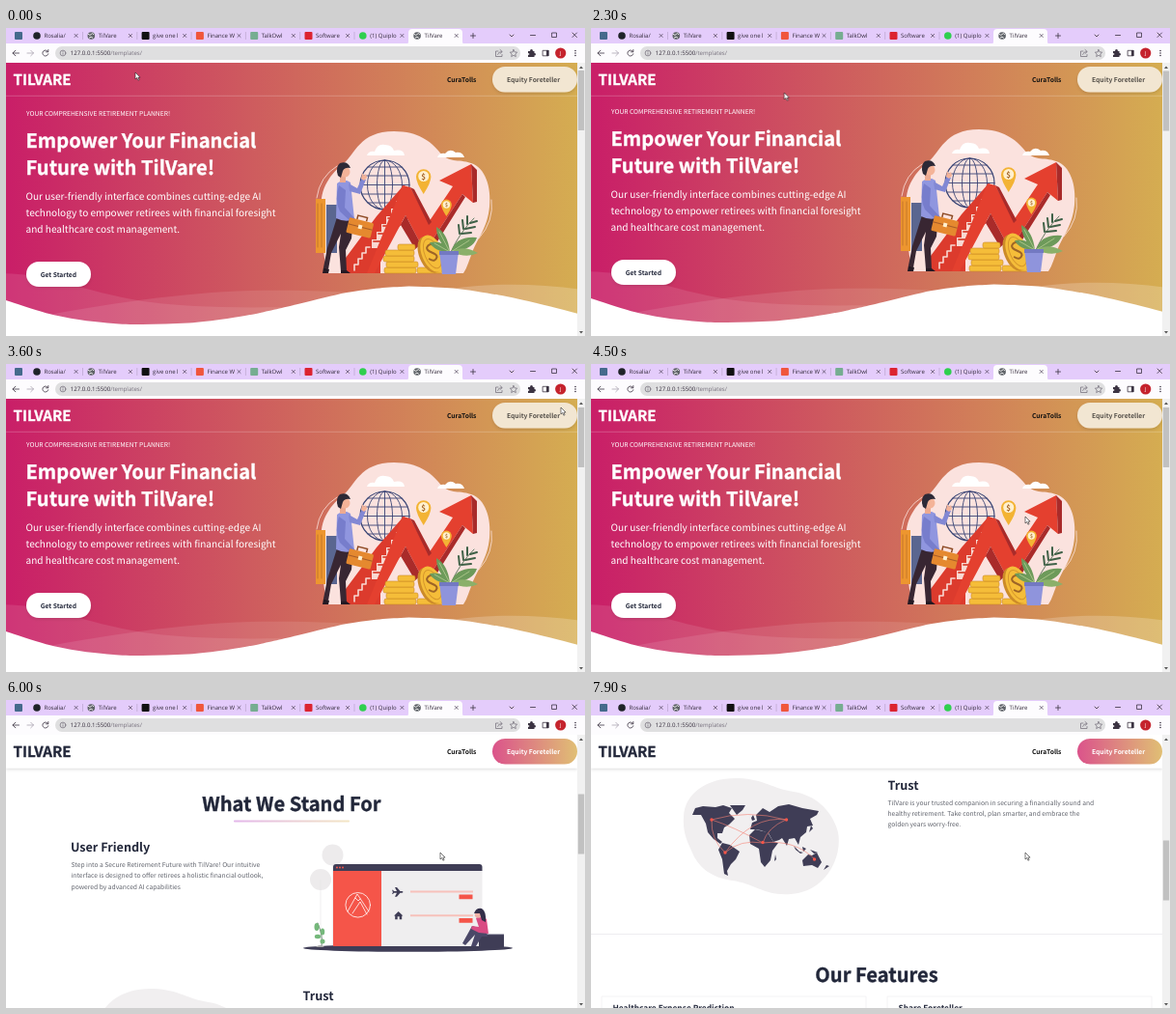
Animation of 600 by 319 pixels, one loop 8000 ms. Source, as an HTML page:

```html
<!DOCTYPE html>
<html lang="en">
<head>
<meta charset="utf-8">
<title>Retirement planner</title>
<style>
html, body { margin: 0; width: 100%; height: 100%; overflow: hidden; background: #fff; }
svg { display: block; }
#stage { width: 600px; height: 319px; }
text { font-family: "Noto Sans CJK JP", "Noto Sans CJK SC", "Noto Sans CJK", "Noto Sans", sans-serif; font-size: 6.71px; text-rendering: geometricPrecision; }
.logo { font-size: 15.1px; font-weight: 700; }
.h1 { font-size: 20.1px; font-weight: 700; }
.h2 { font-size: 12.6px; font-weight: 700; }
.h3 { font-size: 8.4px; font-weight: 700; }
.lead { font-size: 10.07px; }
.b { font-weight: 700; }
.ink { fill: #22273a; }
.ink.h1, .ink.logo { stroke: #22273a; }
.paper { fill: #fff; stroke: #fff; }
.h1, .logo { stroke-width: .35px; }
.body { fill: #62656e; }
.ui { font-family: "Open Sans", "Noto Sans", sans-serif; font-size: 6px; fill: #332a3a; }
.line { fill: none; stroke-linecap: round; stroke-linejoin: round; }

.scroll, .thumb, .top, .solid, .cursor { animation: 8s linear infinite; }
.scroll { animation-name: scroll; }
.thumb { animation-name: thumb; }
.cursor { animation-name: point; }
.top { animation-name: hide; animation-timing-function: step-end; }
.solid { animation-name: show; animation-timing-function: step-end; }
@keyframes scroll {
  0%, 23.75% { transform: translateY(0); }
  28.75% { transform: translateY(-2px); }
  33.5%, 57% { transform: translateY(-5px); }
  61.25% { transform: translateY(-141.5px); }
  67.5%, 76% { transform: translateY(-245px); }
  97.5%, 100% { transform: translateY(-463px); }
}
@keyframes thumb {
  0%, 23.75% { transform: translateY(0); }
  33.5%, 57% { transform: translateY(1px); }
  61.25% { transform: translateY(31px); }
  67.5%, 76% { transform: translateY(53.5px); }
  97.5%, 100% { transform: translateY(101.5px); }
}
@keyframes point {
  0%, 23% { transform: translate(134px, 46px); }
  28.75% { transform: translate(200px, 67px); }
  45%, 47% { transform: translate(575px, 45px); }
  56%, 100% { transform: translate(450px, 158px); }
}
@keyframes hide { 0% { opacity: 1; } 57.1%, 100% { opacity: 0; } }
@keyframes show { 0% { opacity: 0; } 57.1%, 100% { opacity: 1; } }
</style>
</head>
<body>
<svg id="stage" viewBox="0 0 600 319">
<defs>
  <linearGradient id="hero"><stop stop-color="#c91e68"/><stop offset="1" stop-color="#d5af51"/></linearGradient>
  <linearGradient id="pill"><stop stop-color="#db538b"/><stop offset="1" stop-color="#e0bf74"/></linearGradient>
  <linearGradient id="rule"><stop stop-color="#e3b6ea"/><stop offset="1" stop-color="#f3e6c4"/></linearGradient>
  <filter id="shade" x="-20%" y="-30%" width="140%" height="180%"><feDropShadow dx="0" dy="1.5" stdDeviation="1.5" flood-opacity=".13"/></filter>
</defs>

<g class="scroll">
  <rect y="30" width="600" height="279" fill="url(#hero)"/>
  <g fill="#fff">
    <text x="21" y="90.8">YOUR COMPREHENSIVE RETIREMENT PLANNER!</text>
    <text class="h1 paper" x="20.5" y="123.5">Empower Your Financial</text>
    <text class="h1 paper" x="20.5" y="151.6">Future with TilVare!</text>
    <text class="lead" x="20.5" y="177.7">Our user-friendly interface combines cutting-edge AI</text>
    <text class="lead" x="20.5" y="194.6">technology to empower retirees with financial foresight</text>
    <text class="lead" x="20.5" y="211.5">and healthcare cost management.</text>
  </g>

  <!-- hero picture -->
  <path d="M334 254C326 232 329 208 327 190C324 165 338 150 350 140C362 131 366 107 402 107C428 107 440 118 448 127C459 141 468 135 482 140C497 145 503 165 501 185C499 206 490 216 484 230C480 240 478 248 474 254Z" fill="#fbe2de"/>
  <g class="line" stroke="#fbe2de" stroke-width=".8">
    <path d="M322 176Q325 154 343 143M503 178Q506 200 490 218"/>
  </g>
  <path d="M374 132q2-5 8-4q3-9 11-7q7 0 9 6q10-2 11 5zM447 134q2-5 8-4q5-6 11-1q7-1 9 5z" fill="#fff"/>
  <path d="M321 177h10v56h-10z" fill="#ed962f"/>
  <path d="M332 183h11v50h-11z" fill="#5a6690"/>
  <path d="M323 182v45M327 182v45" class="line" stroke="#c4762a"/>
  <g class="line" stroke="#394575" stroke-width=".9">
    <circle cx="392.5" cy="162.5" r="25.5" stroke-width="1.2"/>
    <ellipse cx="392.5" cy="162.5" rx="8" ry="25.5"/>
    <ellipse cx="392.5" cy="162.5" rx="18" ry="25.5"/>
    <path d="M392.5 137v51M367 162.500h51M369 153h47M369 172h47M375 144h35M375 181h35"/>
  </g>
  <path d="M352 254V238L384 195L412 163L418 166V196L388 224V254Z" fill="#dc3b2d"/>
  <path d="M379 228v-9h5v-8h5v-8h5v-8h5v-8h5v-8h5v-8h7v24L386 228Z" fill="#f8d9d2"/>
  <path d="M381 221h11M386 213h13M391 205h14M396 197h15M401 189h14M406 181h10" class="line" stroke="#db5747" stroke-width="1.8"/>
  <path d="M361 251v-6h4v-6h4v-6h4v-6h4" class="line" stroke="#f8d9d2" stroke-width="1.6"/>
  <path d="M411 163L419 165L438 201L463 164L449 158L482 141L484 181L473 172L439 224L430 224L414 194L382 254H374Z" fill="#e4402f"/>
  <path d="M482 141L488 147V180L484 181ZM419 165L423 167L441 201L438 204ZM439 224L473 172L476 175L444 226ZM414 194L430 224L424 229L409 204Z" fill="#a92b2a"/>
  <g fill="#f5bd39" stroke="#c98623" stroke-width=".6">
    <rect x="392" y="248" width="33" height="6" rx="2"/><rect x="394" y="242" width="33" height="6" rx="2"/>
    <rect x="391" y="236" width="32" height="6" rx="2"/><rect x="393" y="230" width="30" height="6" rx="2"/>
    <rect x="406" y="224" width="18" height="6" rx="2"/><rect x="426" y="248" width="26" height="6" rx="2"/>
  </g>
  <g transform="rotate(-22 441 234)">
    <ellipse cx="439" cy="234" rx="11" ry="20" fill="#cc8b28"/>
    <ellipse cx="442" cy="234" rx="11" ry="20" fill="#f5bd39"/>
    <ellipse cx="442" cy="234" rx="8" ry="16" fill="none" stroke="#d5962c"/>
    <path d="M447 227q-4-5-8-1c-3 5 8 8 6 13q-4 5-8-1" class="line" stroke="#9d6427" stroke-width="2"/>
  </g>
  <g fill="#f3b334">
    <path d="M425 154a7.7 7.7 0 1 1 15.4 0q0 6-7.7 18q-7.7-12-7.7-18z"/>
    <path d="M451 183a5.4 5.4 0 1 1 10.8 0q0 4-5.4 12q-5.4-8-5.4-12z"/>
  </g>
  <circle cx="432.7" cy="153.5" r="5.5" fill="#fff0cf"/><circle cx="456.4" cy="183" r="3.7" fill="#fff0cf"/>
  <text class="b" x="432.7" y="156.8" text-anchor="middle" fill="#a56427" style="font-size:8px">$</text>
  <text class="b" x="456.4" y="185" text-anchor="middle" fill="#a56427" style="font-size:5px">$</text>
  <path d="M461 232Q470 212 485 197" class="line" stroke="#3f6147" stroke-width=".8"/>
  <path d="M470 213l-1-9M474 208l-1-9M478 203l0-8M472 213l10-1M476 208l10-2M481 202l7-2" class="line" stroke="#3f6147" stroke-width="2"/>
  <g fill="#6d9a5a">
    <path d="M460 232Q446 221 446 206Q458 213 460 232ZM461 232Q466 215 488 217Q484 230 461 232ZM460 232Q444 232 439 222Q454 219 460 232Z"/>
    <path d="M461 232Q474 224 489 233Q478 239 461 232Z" fill="#8bb06a"/>
  </g>
  <path d="M461 232L480 220M460 232L449 211M460 232L444 223" class="line" stroke="#c0d59a" stroke-width=".7"/>
  <path d="M449 231h20l-3 24h-14z" fill="#8f94dc"/><path d="M449 231h20v4h-20z" fill="#7379c1"/>
  <path d="M343 196L360 195L358 218L352 230L353 252L347 252L345 227L347 213L337 233L334 250L329 248L333 228Z" fill="#382632"/>
  <path d="M329 248l6 2-1 4h-6zM347 251h6l4 3h-10z" fill="#231923"/>
  <path d="M343 161Q350 155 357 160L361 198Q352 202 342 197Z" fill="#9096df"/>
  <path d="M355 161L364 166L369 155L373 157L367 172L356 169Z" fill="#8288d4"/>
  <path d="M368 156l1-6 2 3 2-2 1 4-3 3z" fill="#f4b398"/>
  <path d="M345 163Q340 178 346 190L359 202L362 198L351 186L352 168Z" fill="#777dcc"/>
  <path d="M346 150h6v10h-6z" fill="#edaa91"/><circle cx="351" cy="149" r="5.500" fill="#f4b398"/>
  <path d="M344 153Q341 144 346 140Q354 137 357 145Q351 144 349 148L347 155Z" fill="#2d2936"/>
  <g transform="rotate(14 367 206)">
    <path d="M362 199v-4h10v4" fill="none" stroke="#8e4b25" stroke-width="1.5"/>
    <rect x="354" y="199" width="26" height="16" rx="1.5" fill="#e5892f"/>
    <path d="M354 206h26" stroke="#a85d29"/><rect x="365" y="204" width="4" height="4" fill="#fff0cf"/>
  </g>

  <rect x="21" y="242" width="67" height="26" rx="13" fill="#fff" filter="url(#shade)"/>
  <text class="b ink" x="35.7" y="257.7">Get Started</text>

  <!-- wave -->
  <g transform="translate(0 235.9) scale(.4146)" fill="#fff">
    <g transform="translate(-2 44)">
      <path opacity=".1" d="M0 0C91 1 148 27 292 60C388 82 544 89 759 83C469 156 216 154 0 75"/>
      <path opacity=".1" d="M100 105C277 72 426 53 546 46C666 39 811 42 979 55C931 56 810 75 617 111C423 148 251 145 100 105"/>
      <path opacity=".2" d="M1046 52C1131 29 1279 18 1439 40V120C1271 78 1140 55 1046 52"/>
    </g>
    <path d="M-4 110C53 129 94 142 120 148C177 161 230 166 268 169C307 173 393 172 457 168C483 166 515 162 553 157C592 151 618 146 633 143C660 137 709 126 724 122C776 110 815 99 852 92C919 80 952 79 1007 76C1057 77 1093 79 1117 81C1158 85 1205 94 1231 98C1282 107 1350 123 1450 150V182H-4Z"/>
  </g>

  <rect y="308" width="600" height="500" fill="#fff"/>
  <text class="h1 ink" x="296" y="360" text-anchor="middle">What We Stand For</text>
  <rect x="236" y="369.6" width="120" height="1.9" rx=".9" fill="url(#rule)"/>
  <text class="h2 ink" x="67" y="402">User Friendly</text>
  <g class="body">
    <text x="67.5" y="418">Step into a Secure Retirement Future with TilVare! Our intuitive</text>
    <text x="67.5" y="429.2">interface is designed to offer retirees a holistic financial outlook,</text>
    <text x="67.5" y="440.5">powered by advanced AI capabilities</text>
  </g>

  <!-- window picture -->
  <g transform="translate(0 245)">
    <g fill="#edebec"><circle cx="338.5" cy="160.5" r="11"/><circle cx="326" cy="186" r="11"/></g>
    <path d="M338.5 171v84M326 186v67" stroke="#e6e4e6" stroke-width=".6"/>
    <ellipse cx="416.5" cy="257" rx="108.5" ry="3.8" fill="#3f3d56"/>
    <path d="M339 176h154.500v79H339z" fill="#efeeef"/>
    <path d="M339 176h50v79h-50z" fill="#f55549"/>
    <path d="M339 177v-4q0-3 3-3h148.500q3 0 3 3v4z" fill="#3f3d56"/>
    <g fill="#f55549"><circle cx="343" cy="173.500" r="1"/><circle cx="346" cy="173.500" r="1"/><circle cx="349" cy="173.500" r="1"/></g>
    <g class="line" stroke="#fff" stroke-width=".8"><circle cx="364.700" cy="212.300" r="12.800"/><path d="M354 219L364 201L376 219M359 221L367 209L374 222M362 205l3 3 2-2"/></g>
    <path d="M419 197.500h65v2h-65zM419 222.300h65v2h-65z" fill="#f7c1bb"/>
    <path d="M469.500 201.500h14v4.700h-14zM469.500 226h14v4.700h-14z" fill="#f55549"/>
    <path d="M402 198h3l-2-4h2l3.500 4h2q2 .9 0 1.800h-2l-3.500 4h-2l2-4h-3l-1 1.200h-.9l.8-2-.8-2.200h.9z" fill="#3f3d56"/>
    <path d="M402 223.500l4.700-4.500 4.700 4.500h-1.200v3.800h-2.500v-3h-2v3h-2.500v-3.800z" fill="#3f3d56"/>
    <path d="M490 243h26v13h-26z" fill="#3f3d56"/><path d="M490 243h26" stroke="#57546f"/>
    <path d="M498 239L483 234L473 252L476 254L486 243L482 255L487 255L493 245L499 245Z" fill="#4b4868"/>
    <path d="M487 226Q493 221 498 227L500 242L490 241L482 237L483 234L490 235Z" fill="#d94b83"/>
    <circle cx="489.500" cy="222" r="3.800" fill="#eeb1a7"/>
    <path d="M485 221Q487 215 493 216Q498 219 497 230L493 228L491 221Z" fill="#332f4a"/>
    <path d="M327 255Q329 245 323 231" class="line" stroke="#4f6c58" stroke-width=".8"/>
    <g fill="#75b87b"><ellipse cx="322" cy="235" rx="2.500" ry="4"/><ellipse cx="328" cy="240" rx="2.200" ry="3.500"/><ellipse cx="323" cy="245" rx="3.200" ry="2.200"/><ellipse cx="328" cy="250" rx="2.500" ry="2.500"/></g>
    <path d="M321 256q4-4 9 0z" fill="#a8a8a8"/>
  </g>

  <!-- map picture -->
  <g transform="translate(0 463)">
    <path d="M96 121C97 96 121 80 153 81C179 82 189 92 210 95C235 99 251 117 256 137C261 163 243 199 207 201C179 203 170 190 146 187C125 184 111 174 104 156C99 145 95 136 96 121Z" fill="#f1eff0"/>
    <g fill="#3f3d56">
      <path d="M105 119L108 112L116 110L129 111L137 109L146 112L143 117L149 123L143 129L138 132L136 138L131 138L131 143L136 147L134 149L127 144L121 137L119 128L114 119Z"/>
      <path d="M144 109L160 109L157 114L151 119Z"/>
      <path d="M136 148L144 150L154 157L150 165L145 170L141 177L142 182L138 180L136 165L132 155Z"/>
      <path d="M164 140L170 134L183 137L189 147L194 148L188 156L186 166L180 173L176 168L174 154L165 149Z"/>
      <path d="M165 134L167 127L172 125L171 119L178 112L185 116L194 110L205 108L219 112L236 115L234 119L227 123L230 130L224 131L223 137L217 142L215 150L211 143L205 144L203 151L198 143L195 145L189 147L184 138L176 135L170 134Z"/>
      <path d="M219 166L225 160L229 161L234 158L239 168L235 174L229 171L220 172Z"/>
      <path d="M210 151l6 6 4 1-3 1-5-4zM219 152l4 2-3 3zM227 155l8 3-4 1zM228 130l2 3-4 4zM191 160l1 5-2 2zM166 122l2-3 2 5-3 1zM244 171l3 1-6 4z"/>
    </g>
    <path d="M125 124Q124 145 139 158Q155 144 178 148Q183 132 202 124Q162 113 125 124Q147 131 178 148Q211 144 232 165M139 158Q167 119 202 124" class="line" stroke="#f58274" stroke-width=".6"/>
    <g fill="#f55549"><circle cx="125" cy="124" r="1.700"/><circle cx="139" cy="158" r="1.700"/><circle cx="178" cy="147.500" r="1.700"/><circle cx="202.500" cy="124" r="1.700"/><circle cx="231.500" cy="165" r="1.700"/></g>
  </g>
  <text class="h2 ink" x="307.5" y="556">Trust</text>
  <g class="body">
    <text x="307.5" y="571.5">TilVare is your trusted companion in securing a financially sound and</text>
    <text x="307.5" y="582.8">healthy retirement. Take control, plan smarter, and embrace the</text>
    <text x="307.5" y="594">golden years worry-free.</text>
  </g>

  <path d="M0 705.500h592" stroke="#eeedf0"/>
  <text class="h1 ink" x="296" y="754.500" text-anchor="middle">Our Features</text>
  <path d="M11 800v-30h274v30M307 800v-30h274v30" fill="none" stroke="#f4f3f5"/>
  <text class="h3 ink" x="22.500" y="784.500">Healthcare Expense Prediction</text>
  <text class="h3 ink" x="318.500" y="784.500">Share Foreteller</text>
</g>

<!-- page header -->
<g class="top">
  <path d="M0 70.300h592" stroke="#fff" stroke-opacity=".28" stroke-width=".8"/>
  <rect x="504" y="40" width="88" height="26.500" rx="13.200" fill="#f2e6d2" filter="url(#shade)"/>
  <text class="logo paper" x="7.500" y="59.300">TILVARE</text>
  <text class="b" x="519" y="55.800" fill="#55504a">Equity Foreteller</text>
</g>
<g class="solid">
  <rect y="36" width="592" height="34.500" fill="#fff" filter="url(#shade)"/>
  <rect x="504" y="40" width="88" height="26.500" rx="13.200" fill="url(#pill)"/>
  <text class="logo ink" x="7.500" y="59.300">TILVARE</text>
  <text class="b" x="519" y="55.800" fill="#fff">Equity Foreteller</text>
</g>
<text class="b" x="457" y="55.800" fill="#111">CuraTolls</text>

<rect x="592" y="36" width="8" height="283" fill="#f1f1f1"/>
<path d="M594 42l2-2.500 2 2.500zM594 314l2 2.500 2-2.500z" fill="#555"/>
<rect class="thumb" x="592.800" y="44" width="6.400" height="62" fill="#c1c1c1"/>

<!-- browser frame -->
<rect width="600" height="17" fill="#e4ccfb"/>
<path d="M414 17q3 0 3-3V5q0-4 4-4h48q4 0 4 4v9q0 3 3 3z" fill="#fdfcfe"/>
<rect y="16" width="600" height="20" fill="#fdfcfe"/>
<rect x="51" y="19" width="482" height="14" rx="7" fill="#dfdfe0"/>
<g id="tabs"></g>
<g class="line" stroke="#3b3342" stroke-width=".8">
  <path d="M481.500 8h5M484 5.500v5M522 7l2 2 2-2M543.500 7.500h5M566 5h4.500v4.500h-4.500zM587 5l4.500 4.500M591.500 5l-4.500 4.500"/>
  <path d="M13.500 26h-6.500m2.800-2.800L7 26l2.800 2.800"/>
  <path d="M22 26h6.500m-2.800-2.800L28.500 26l-2.800 2.800" stroke="#aaa3b0"/>
  <path d="M43.500 24.500a3 3 0 1 0 .3 2.300M43.800 22.500v2.300h-2.300"/>
  <g stroke="#6e6775" stroke-width=".7"><circle cx="59" cy="26" r="2.900"/><path d="M59 25.800v1.500M59 24.500v.1"/>
    <path d="M510 24h-2.500v5.500h6.500v-2M509.500 27.500q.5-3 4-3m-1.500-2l2.300 2-2.300 2"/>
    <path d="M526 22.500l1.100 2.400 2.600.3-1.900 1.800.5 2.600-2.300-1.300-2.300 1.300.5-2.600-1.900-1.800 2.600-.3z"/></g>
  <path d="M556.500 23.300h5.500v5.500h-5.500z"/>
</g>
<path d="M560 23h2.500v6H560z" fill="#3b3342"/>
<path d="M541 24h2q0-2 1.500-2t1.500 2h1.500v2q1.500 0 1.500 1.300T547.500 28.600v1.400H541v-2q1.500-.3 1.500-1t-1.500-1z" fill="#3b3342"/>
<circle cx="574.700" cy="26" r="5.600" fill="#c5232d"/>
<text class="ui" x="574.700" y="28" text-anchor="middle" style="fill:#fff;font-size:5.500px">J</text>
<g fill="#3b3342"><circle cx="590" cy="23.500" r=".8"/><circle cx="590" cy="26" r=".8"/><circle cx="590" cy="28.500" r=".8"/></g>
<text class="ui" x="66.800" y="28.300" style="font-size:6.100px">127.0.0.1:5500<tspan fill="#77707d">/templates/</tspan></text>

<g class="cursor"><path d="M0 0v7l1.700-1.500 1.200 2.700 1.200-.5-1.200-2.600h2.200z" fill="#fff" stroke="#222" stroke-width=".6"/></g>
</svg>
<script>
const square = (x, color) => `<rect x="${x - 4}" y="4" width="8" height="8" rx="1" fill="${color}"/>`;
const disc = (x, color) => `<circle cx="${x}" cy="8" r="3.8" fill="${color}"/>`;
const globe = x => disc(x, "#5f6368") +
  `<path d="M${x - 3} 6.500q2 2 3 0t2.500 0M${x - 2} 10q2-2 3.500 0" class="line" stroke="#eee" stroke-width="1"/>`;
const tabs = [
  ["Rosalia/", disc, "#1f2328"], ["TilVare", globe], ["give one l", square, "#111"],
  ["Finance W", square, "#f0563c"], ["TalkOwl", square, "#76ad91"], ["Software", square, "#dc2430"],
  ["(1) Quiplo", disc, "#2fcf4f"], ["TilVare", globe]
];
document.getElementById("tabs").innerHTML = square(13, "#456a8c") + tabs.map(([name, icon, color], i) => {
  const x = 24 + 56.3 * i;
  const edge = i < 6 ? `<path d="M${x + 55.5} 4v8" stroke="#a994b8" stroke-width=".5"/>` : "";
  return icon(x + 8, color) + `<text class="ui" x="${x + 15.5}" y="10.300">${name}</text>` +
    `<path d="M${x + 47} 6.300l3.200 3.200m0-3.200l-3.200 3.200" class="line" stroke="#4a3d54" stroke-width=".7"/>` + edge;
}).join("");
</script>
</body>
</html>
```
